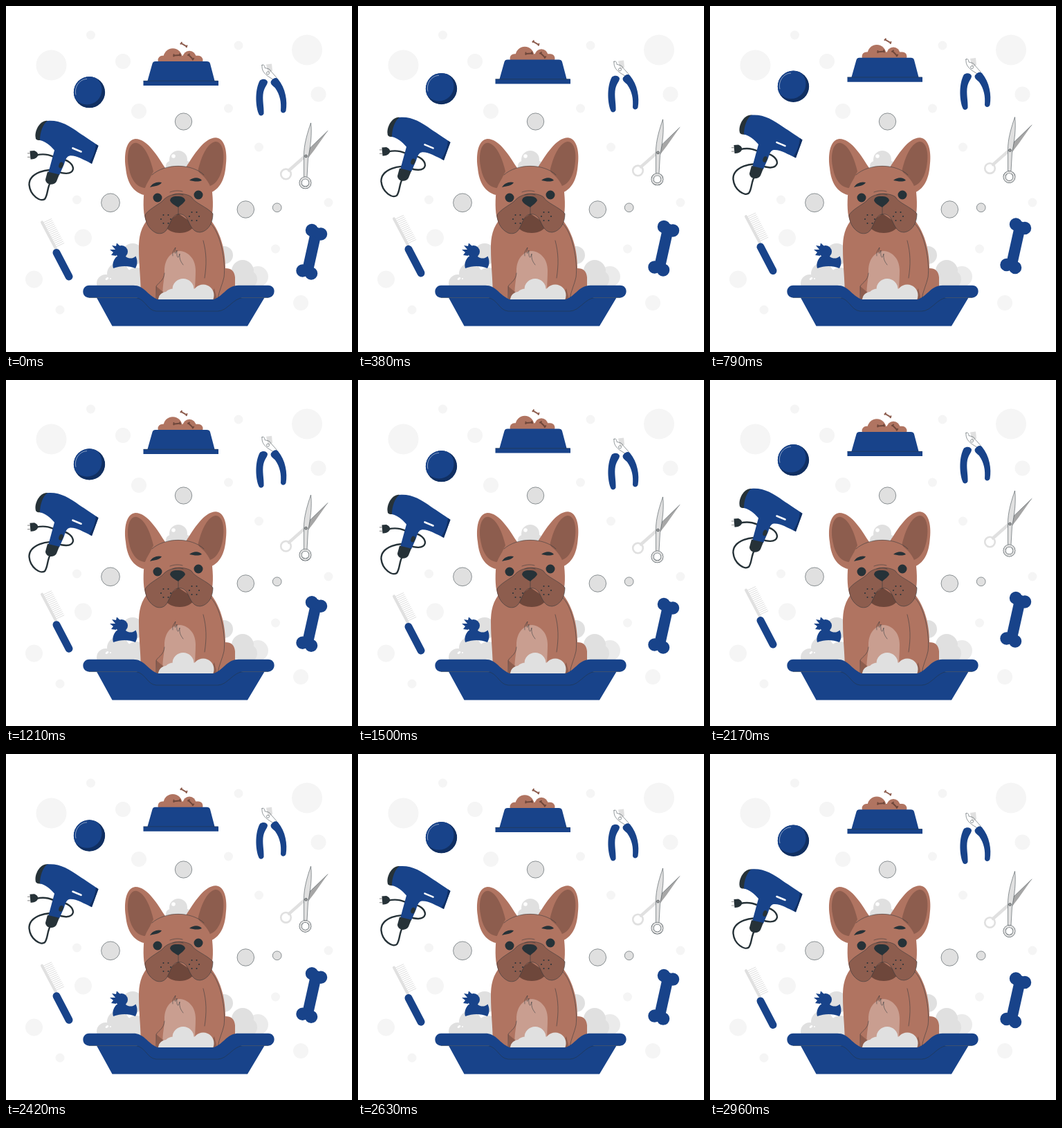
An HTML page for the animation above (3000 ms loop, 500 px wide and 500 px high).

```html
<!DOCTYPE html>
<html lang="en">
<head>
<meta charset="utf-8">
<title>Dog bath</title>
<style>
html, body { margin: 0; width: 100%; height: 100%; overflow: hidden; background: #fff; }
svg { display: block; width: 100vw; height: 100vh; }
.blue { fill: #18438a; }
.navy { fill: #102f62; }
.dark { fill: #263238; }
.fur { fill: #b07461; }
.shade { fill: #8d5d4e; }
.mouth { fill: #6e473b; }
.foam { fill: #e0e0e0; }
.line { fill: none; stroke: #263238; stroke-width: .5; stroke-linecap: round; stroke-linejoin: round; }
.edge { stroke: #263238; stroke-width: .5; stroke-linejoin: round; }
.dots { fill: none; stroke-linecap: round; }
</style>
</head>
<body>
<svg viewBox="0 0 500 500">
  <defs>
    <path id="treat" d="M-3.5-1C-3-3-6-3-5.3-.8C-7 1-4.5 3-3.5 1H3.5C4.5 3 7 1 5.3-.8C6-3 3-3 3.5-1Z"/>
    <clipPath id="ballClip"><circle cx="120.5" cy="125.2" r="22.7"/></clipPath>
  </defs>

  <!-- round spots: zero-length strokes with round caps -->
  <g class="dots" stroke="#f5f5f5">
    <path stroke-width="44" d="M65.5 85.5h0M435 63.5h0"/>
    <path stroke-width="22" d="M169 80h0M192 152h0M451.5 127.5h0M426 429h0"/>
    <path stroke-width="25" d="M111.500 335h0M40.500 395h0"/>
    <path stroke-width="13" d="M122.500 42h0M336 57h0M321.500 148h0M365.500 204h0M466 284h0M389.500 351h0M102.500 280h0M78 439h0"/>
  </g>
  <g class="foam edge">
    <circle cx="256.500" cy="167" r="12.200"/>
    <circle cx="151" cy="284.300" r="13.400"/>
    <circle cx="346.300" cy="294" r="12.300"/>
    <circle cx="391.700" cy="291.300" r="6.400"/>
  </g>

  <!-- foam behind the dog -->
  <circle cx="364" cy="391" r="15" fill="#ebebeb"/>
  <g class="dots" stroke="#e0e0e0">
    <path stroke-width="32" d="M183 359h0M162 387h0M166 392h0M188 394h0M342 383h0"/>
    <path stroke-width="26" d="M144 401h0M315 360h0M249 222h0M320 395h30"/>
    <path stroke-width="14" d="M238 231H261"/>
  </g>
  <g fill="#fff">
    <circle cx="242" cy="217" r="2.800"/>
    <ellipse cx="146" cy="394" rx="2.600" ry="1.600" transform="rotate(-35 146 394)"/>
    <circle cx="151" cy="394" r="1"/>
  </g>

  <!-- duck -->
  <g class="blue">
    <circle cx="167" cy="355" r="9"/>
    <path d="M159 361L152 360L155 356L150 352L158 352L153 346L159 347L160 342.500L166 348Z"/>
    <path d="M160 362H173C178 366 184 365 187.500 361.500C190.500 368 190 374 187 379C177 375 166 375 155 379C153 372 156 366 160 362Z"/>
  </g>

  <!-- body -->
  <path class="fur" d="M208 304C194 320 192 334 192 350C192 376 195 394 195 424H331V392C330 383 326 379 317 379C317 352 310 324 291 304Z"/>
  <path d="M251 354C238 355 229 366 229 383C229 397 225 406 227 424H274C272 410 274 398 274 382C274 366 264 355 251 354Z" fill="#c99e90"/>
  <path class="shade" d="M217 405L229 415L222 424H218ZM301 408L305 424H293Z"/>
  <path class="line" d="M217 424V405C222 398 228 397 229 386M285 339C290 358 290 373 287 393M294 313C310 325 318 370 315 392C313 402 308 411 306 423M241 361C240 355 243 352 245 349C243 357 244 361 247 353C246 363 249 367 251 358C250 367 254 371 256 374"/>

  <!-- ears -->
  <g id="ear">
    <path class="fur" d="M230 234C220 219 205 192 187 192C174 193 170 213 173 234C175 256 184 269 199 273L225 252Z"/>
    <path class="shade" d="M189 198C178 196 174 214 177 231C180 250 188 262 201 263L213 239C209 222 201 201 189 198Z"/>
  </g>
  <use href="#ear" transform="translate(490.500 -1.800) scale(-1 1)"/>

  <!-- head -->
  <path class="fur" d="M249 231C221 231 200 250 199 275C198 292 199 308 205 316L249 325L294 314C299 304 300 289 298 269C293 247 273 231 249 231Z"/>
  <path class="line" d="M211 244C230 227 268 227 286 244"/>
  <path class="mouth" d="M230 314L249 300L273 316C269 324 261 328 251 328C242 328 236 325 232 321Z"/>
  <path class="shade edge" d="M201 302C206 294 217 289 226 282C236 269 259 269 268 276C273 285 290 290 299 300C299 315 291 326 280 327C269 327 266 315 262 308C258 301 252 300 248 301C241 302 238 312 234 320C230 329 223 330 217 328C206 323 201 311 201 302Z"/>
  <path class="dark" d="M237 281C238 275 244 275 248 275C253 275 258 276 259 281C257 285 252 288 249 291C244 288 239 286 237 281Z"/>
  <path class="line" d="M249 290V301M237 269C242 267 249 266 255 268M241 273C246 271 251 271 256 273"/>
  <path class="dots" stroke="#263238" stroke-width="13" d="M219 277h0M278 273h0"/>
  <path class="dark" d="M208 262C211 256 219 253 225 255C222 260 215 260 208 262ZM265 252C271 247 279 247 283 252C277 255 271 253 265 252Z"/>
  <path id="freckles" class="dots" stroke="#263238" stroke-width="2"/>

  <!-- tub -->
  <g class="dots" stroke="#e0e0e0">
    <path stroke-width="31" d="M256 409.500h0M285 418h0M242 424H280"/>
    <path stroke-width="24" d="M232 425h0"/>
  </g>
  <path class="blue" d="M131 421.500H190L220 428H300L340 421.500H373.500L349 462.500H153.500Z"/>
  <path class="blue" d="M120 403.800H184C200 403.800 204 418 219 424H300C315 419 319 403.800 336 403.800H379C391 404 390 421 379 421.500H343C328 422 320 441 306 441H216C204 440 204 424 188 421.500H120C108 421 109 404 120 403.800Z"/>
  <path class="line" d="M120 421.500H188C202 424 204 440 217 441H306C320 441 328 422 343 421.500H379"/>

  <!-- food bowl -->
  <g id="bowl">
    <g class="dots" stroke="#b07461">
      <path stroke-width="27" d="M241 75h0"/>
      <path stroke-width="19" d="M265 74.500h0"/>
      <path stroke-width="13" d="M226 78.500H278"/>
    </g>
    <g class="mouth">
      <use href="#treat" transform="translate(247 71.500) rotate(-5)"/>
      <use href="#treat" transform="translate(267 74) rotate(45)"/>
    </g>
    <use href="#treat" class="shade" transform="translate(257 56.500) rotate(30)"/>
    <path class="blue" d="M216 80.300H290Q294 80.300 295 83.500L301.500 108.300H307V115.300H198.500V108.300H204.500L211.500 83.500Q212.500 80.300 216 80.300Z"/>
    <path class="line" d="M199 108.500H306"/>
  </g>

  <g id="tools">
    <!-- ball -->
    <g clip-path="url(#ballClip)">
      <circle class="navy" cx="120.500" cy="125.200" r="23"/>
      <circle class="blue" cx="117" cy="121.500" r="21.500"/>
    </g>
    <path d="M101 129C98 117 107 106 117 106" fill="none" stroke="#d5ddea" stroke-width=".6"/>

    <!-- dryer -->
    <path fill="none" stroke="#263238" stroke-width="2.400" d="M44 216C58 213 66 217 75 221C91 222 97 230 97 236C95 245 81 243 74 239C62 234 33 241 33.500 259C35 275 50 284 56 279.500C61 273 59 263 65 254"/>
    <path class="dark" d="M34.500 210L41 209.500C45 211 47 214 46 217C44 221 40 222 35.500 222Z"/>
    <path d="M31 213.500H35M31 219H35" stroke="#9a9a9a" stroke-width="1.200"/>
    <path class="dark" d="M60 166.500C50 165 40 181 43 192Q44 195 51 194.500L64 168Z"/>
    <path class="blue" d="M60 166.500C77 165 91 173 106 184C115 190 123 195 133.500 202.500L124 228.500C112 223 101 216 92 217C87 218 86 223 84 229L77 245L61 242L70 209C64 202 57 196 49 194.500C49 184 53 171 60 166.500Z"/>
    <path class="dark" d="M60 240L77 244L73 254C69 261 57 259 57 251Z"/>
    <path class="navy" d="M130 200L133.500 202.500L124 228.500L120.500 226.500C126 219 129 210 130 200Z"/>
    <path d="M96.500 206L108.500 211" stroke="#fff" stroke-width="2.600" stroke-linecap="round"/>
    <ellipse class="dark" cx="79.500" cy="230.500" rx="3" ry="4.500" transform="rotate(20 79.500 230.500)"/>

    <!-- comb -->
    <path id="teeth" fill="none" stroke="#d6d6d6" stroke-width=".8"/>
    <path class="dots" stroke="#e0e0e0" stroke-width="4" d="M52 313L72 351"/>
    <path class="dots" stroke="#18438a" stroke-width="11" d="M73 357L91 391.500"/>

    <!-- clippers -->
    <path class="foam" d="M376 85L384 84L385 94L379 98Z"/>
    <path class="line" fill="#fff" d="M370 86C369 94 374 99 380 103L388 108L391 104L383 95C381 91 378 91 374 90C374 87 372 84 370 86Z"/>
    <circle cx="378.500" cy="97.500" r="2" fill="#fff" class="edge"/>
    <path class="blue" d="M367 108C371 105 377 106 378 110C378 114 374 117 372 125C370 135 373 146 372.500 156C371 160 366 160 365 156C360 143 360 120 367 108Z"/>
    <path class="blue" d="M383 109C386 105 390 103 393 106C404 119 407 138 404.500 152C403 156 398 156 397 152C398 139 396 129 389 119C386 116 381 113 383 109Z"/>

    <!-- scissors -->
    <path d="M465 181L431 214L436 221L446 208Z" fill="#a6a6a6"/>
    <path class="line" d="M465 181L438 207"/>
    <path class="dots" stroke="#e0e0e0" stroke-width="4.500" d="M435 215L409 238"/>
    <circle cx="404.500" cy="243.500" r="7.300" fill="none" stroke="#e0e0e0" stroke-width="2.600"/>
    <path class="foam edge" d="M440.500 169.500C442.500 185 440 204 436.500 221L435 248H430.500L430.500 218C430 201 436 183 440.500 169.500Z"/>
    <g fill="none">
      <circle cx="432.500" cy="256" r="7" stroke="#263238" stroke-width="3.800"/>
      <circle cx="432.500" cy="256" r="7" stroke="#e0e0e0" stroke-width="2.800"/>
    </g>
    <circle class="edge" cx="433.500" cy="217.500" r="2" fill="#999"/>

    <!-- bone -->
    <g class="dots" stroke="#18438a">
      <path stroke-width="16" d="M448 328L436 382"/>
      <path stroke-width="18.500" d="M442 324.500h0M455 330h0M428.500 383h0M441 387h0"/>
    </g>
  </g>
</svg>
<script>
const $ = id => document.getElementById(id);
const repeat = (n, part) => Array.from({ length: n }, (_, i) => part(i)).join('');

// Each cheek has a loose ring of freckles.
const ring = (x, y) => repeat(6, i =>
  `M${x + 7 * Math.cos(i * Math.PI / 3)} ${y + 7 * Math.sin(i * Math.PI / 3)}h0`);

$('freckles').setAttribute('d', ring(231, 308) + ring(272, 304));
$('teeth').setAttribute('d', repeat(15, i => `M${53 + i * 1.3} ${314 + i * 2.5}l13 -6`));

// Linear rise by 10 px and return within one period.
const lift = (t, period) => {
  const p = t % period / period;
  return -20 * Math.min(p, 1 - p);
};
const move = (id, y) => $(id).setAttribute('transform', `translate(0 ${y.toFixed(3)})`);

function draw(now) {
  const t = now + 40;
  move('tools', lift(t, 1500));
  move('bowl', lift(t, 3000));
  requestAnimationFrame(draw);
}
draw(0);
</script>
</body>
</html>
```
